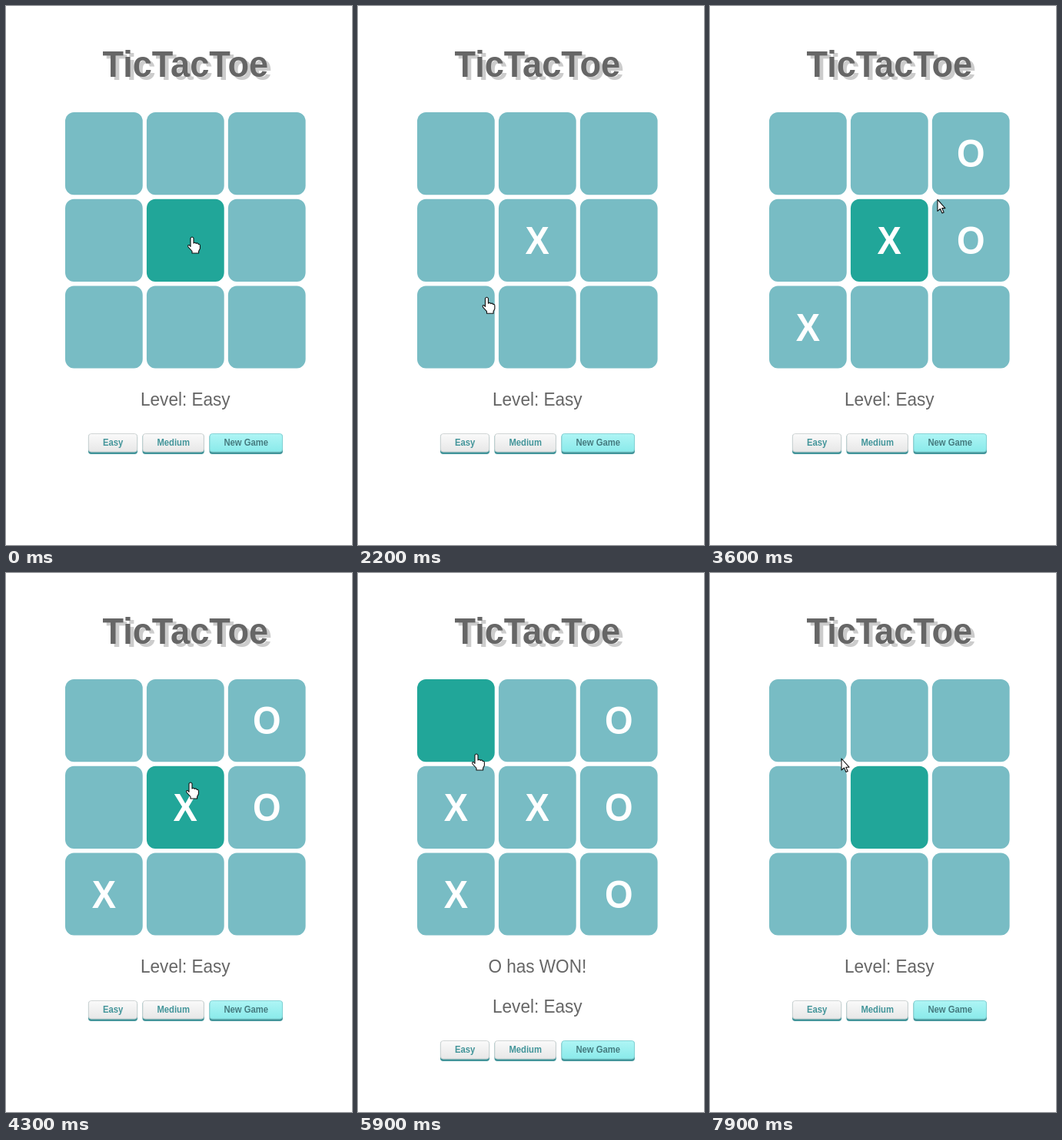
These frames come from a looping animation (450x700 px, 8000 ms). An HTML page:

```html
<!DOCTYPE html>
<html>
<head>
<meta charset="utf-8">
<title>TicTacToe</title>
<style>
  html, body { margin: 0; width: 100%; height: 100%; overflow: hidden; background: #fff; }
  svg { display: block; font-family: "Liberation Sans", Arial, sans-serif; }
  text { text-anchor: middle; }
  .title { font-size: 48px; font-weight: bold; }
  .mark { font-size: 50px; font-weight: bold; fill: #fff; }
  .line { font-size: 24px; fill: #666; }
  .label { font-size: 12px; font-weight: bold; }
  .cursor { fill: #fff; stroke: #111; stroke-width: 1.1; stroke-linejoin: round; }
</style>
</head>
<body>
<svg width="450" height="700" viewBox="0 0 450 700">
  <defs>
    <linearGradient id="grey" x2="0" y2="1"><stop stop-color="#fafafa"/><stop offset="1" stop-color="#e7e7e7"/></linearGradient>
    <linearGradient id="aqua" x2="0" y2="1"><stop stop-color="#aef5f5"/><stop offset="1" stop-color="#8aeaea"/></linearGradient>
    <linearGradient id="lit" x2="0" y2="1"><stop stop-color="#84e6e6"/><stop offset="1" stop-color="#a8f3f3"/></linearGradient>
  </defs>
  <!-- the whole page is slightly narrowed -->
  <g transform="translate(233.3) scale(.94 1)">
    <text class="title" x="5" y="96" fill="#ccc">TicTacToe</text>
    <text class="title" y="92" fill="#666">TicTacToe</text>
    <g id="board"></g>
    <text id="result" class="line" y="519">O has WON!</text>
    <g id="footer"><text class="line" y="519">Level: Easy</text></g>
  </g>
  <path id="hand" class="cursor" d="M-2 1.5Q0 -1.5 2 1.5V8Q4 6.2 5.2 8.4Q7.2 7 8.2 9.4Q10.4 8.6 10.4 11.5V15L8.6 18.5V21H0V18.5L-5 13Q-6 10 -3.6 10.5L-2 12.3Z"/>
  <path id="arrow" class="cursor" d="M0 0V15L3.5 12L6 17.5L8.2 16.5L5.8 11.2H10Z"/>
</svg>
<script>
const LOOP = 8000, STEP = 100, WIN = 5000, RESET = 7200, SHIFT = 52;
const CENTER = 233.3, NARROW = .94, PITCH = 112.7, SIDE = 107.2;
const $ = id => document.getElementById(id);

// mark, time it appears, cell index
const moves = [
  ["X", 1600, 4], ["X", 2600, 6], ["O", 2800, 2], ["O", 2800, 5],
  ["X", 4700, 3], ["O", WIN, 8]
];

// places the pointer eases between: time, x, y
const stops = [
  [0, 242, 300], [1500, 230, 290], [1700, 230, 290], [2400, 152, 400], [3000, 166, 394],
  [3800, 320, 225], [4300, 240, 272], [4700, 140, 290], [5700, 154, 235], [5900, 154, 235],
  [6800, 287, 617], [RESET, 287, 617], [7700, 215, 300], [7900, 171, 241]
];

const cells = [...Array(9).keys()].map(i => ({
  x: (i % 3 - 1) * PITCH, y: 304.3 + (Math.floor(i / 3) - 1) * PITCH
}));

$("board").innerHTML = cells.map(({x, y}) =>
  `<rect x="${x - SIDE / 2}" y="${y - SIDE / 2}" width="${SIDE}" height="${SIDE}" rx="12"/>
   <text class="mark" x="${x}" y="${y + 17.6}"></text>`).join("");
const tiles = $("board").querySelectorAll("rect");
const marks = $("board").querySelectorAll("text");

function button(label, x, w, fill, border, ink) {
  return `<rect x="${x}" y="556" width="${w}" height="26" rx="4" fill="#43959a"/>
    <rect class="face" x="${x + .5}" y="555.5" width="${w - 1}" height="23.5" rx="3.5" fill="${fill}" stroke="${border}"/>
    <text class="label" x="${x + w / 2}" y="571" fill="${ink}">${label}</text>`;
}
$("footer").innerHTML +=
  button("Easy", -134.4, 68.2, "url(#grey)", "#d0d4d4", "#43959a") +
  button("Medium", -59.4, 85.5, "url(#grey)", "#d0d4d4", "#43959a") +
  button("New Game", 33.2, 101.6, "url(#aqua)", "#86d3d5", "#467c80");
const newGame = document.querySelectorAll(".face")[2];

function pointer(t) {
  const i = Math.max(1, stops.findIndex(s => s[0] >= t));
  const [t0, x0, y0] = stops[i - 1], [t1, x1, y1] = stops[i];
  const k = (t - t0) / (t1 - t0), ease = k * k * (3 - 2 * k);
  return [x0 + (x1 - x0) * ease, y0 + (y1 - y0) * ease];
}

// cell index, 9 for the New Game button, -1 for nothing
function target([x, y], shift) {
  if (x > 264 && x < 360 && y > 555 + shift && y < 582 + shift) return 9;
  const u = (x - CENTER) / NARROW, reach = SIDE / 2 - 5;
  return cells.findIndex(c => Math.abs(u - c.x) < reach && Math.abs(y - c.y) < reach);
}

function draw(now) {
  const t = Math.floor(now % LOOP / STEP) * STEP;
  const won = t >= WIN && t < RESET, shift = won ? SHIFT : 0;
  const at = pointer(t), over = target(at, shift);
  const hover = target(pointer(Math.max(0, t - STEP)), shift); // highlight trails the pointer

  tiles.forEach((r, i) => r.setAttribute("fill", i === hover ? "#21a699" : "#78bcc4"));
  marks.forEach((m, i) => {
    const move = moves.find(([, start, cell]) => cell === i && t >= start && t < RESET);
    m.textContent = move ? move[0] : "";
  });
  $("result").style.display = won ? "" : "none";
  $("footer").setAttribute("transform", `translate(0 ${shift})`);
  newGame.setAttribute("fill", hover === 9 ? "url(#lit)" : "url(#aqua)");

  for (const id of ["hand", "arrow"]) {
    $(id).setAttribute("transform", `translate(${at})`);
    $(id).style.display = (id === "hand") === (over >= 0) ? "" : "none";
  }
}

const start = performance.now();
function frame() {
  draw(performance.now() - start);
  requestAnimationFrame(frame);
}
frame();
</script>
</body>
</html>
```
